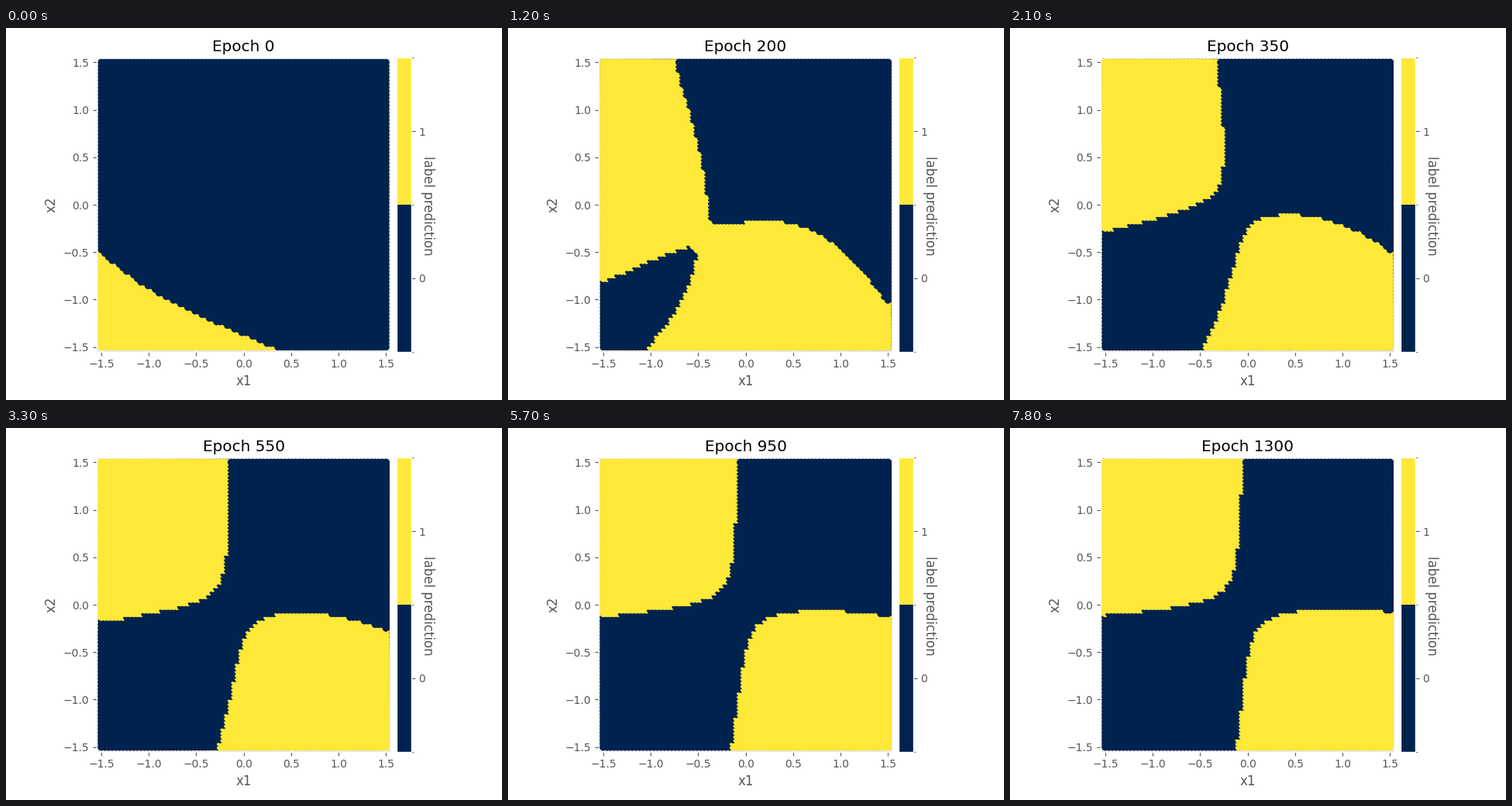
A matplotlib script for the animation above (8 s loop, 640 by 480 pixels).

```python
import numpy as np
import matplotlib.pyplot as plt
from matplotlib.animation import FuncAnimation
from matplotlib.colors import BoundaryNorm, ListedColormap

W, H, DPI = 640, 480, 100
CENTER_X, CENTER_Y, UNIT = 306.6, 228.0, 122.4   # data origin and scale in pixels
LIMIT = 1.55
GREY = "#555555"
EPOCH_STEP, STEPS, TRAIL = 50, 27, 8

plt.rcParams.update({
    "font.family": "DejaVu Sans", "font.size": 10,
    "axes.facecolor": "#E5E5E5", "axes.edgecolor": "white", "axes.linewidth": 1,
    "axes.grid": True, "axes.axisbelow": True, "grid.color": "white",
    "axes.labelcolor": GREY, "axes.labelsize": 12, "axes.titlesize": 14.4,
    "xtick.color": GREY, "ytick.color": GREY, "patch.linewidth": 0.5,
})

axis = np.linspace(-1.5, 1.5, 80)
x, y = (g.ravel() for g in np.meshgrid(axis, axis))
grid = np.column_stack([x, y])
border = np.maximum(abs(x), abs(y)) > 1.499


def single_boundary(epoch):
    """One curve sweeping up from the lower left, fast at first."""
    u = np.log1p(epoch / 15) / np.log1p(100 / 15)
    height = -1.36 + 1.24 * u
    slope = -0.42 - 0.28 * u
    cubic = -0.07 - 0.13 * u
    bulge = 0.45 * u * x**2 / (1 + 0.9 * x**2)
    return height + slope * x + bulge + cubic * x**3 - y


def crossed_boundaries(epoch):
    """Hyperbola around two bent lines that straighten out with training."""
    r = 350 / epoch
    early = np.exp((200 - epoch) / 45)
    upright = (-0.14 * r**0.9 - 0.18 * early + 0.03 * (1 - r) * y
               + (0.06 * early - 0.11 * r**1.6) * y**2 + 0.03 * r * y**3)
    level = (-0.01 - 0.18 * early + (0.06 + 0.11 * early) * x
             - 0.16 * r**1.25 * x**2 - (0.05 * r + 0.025 * early) * x**3)
    return 0.048 * early - 0.04 - (x - upright) * (y - level)


def predict(epoch):
    mix = np.clip((epoch - 100) / 100, 0, 1)
    field = ((1 - mix) * single_boundary(min(epoch, 100))
             + mix * crossed_boundaries(max(epoch, 200)))
    return (field > 0).astype(int)


labels = [predict(EPOCH_STEP * k) for k in range(STEPS)]


def pixel_box(left, right):
    half = LIMIT * UNIT
    return [left / W, 1 - (CENTER_Y + half) / H, (right - left) / W, 2 * half / H]


fig = plt.figure(figsize=(W / DPI, H / DPI), dpi=DPI, facecolor="white")
ax = fig.add_axes(pixel_box(CENTER_X - LIMIT * UNIT, CENTER_X + LIMIT * UNIT))
ax.set(xlim=(-LIMIT, LIMIT), ylim=(-LIMIT, LIMIT), xlabel="x1", ylabel="x2")
ticks = np.arange(-1.5, 1.6, 0.5)
ax.set_xticks(ticks)
ax.set_yticks(ticks)
ax.tick_params(length=3.5)
title = ax.set_title("Epoch 0")

dots = ax.scatter(x, y, c=labels[0], s=36,
                  cmap=ListedColormap(["#00224e", "#fee838"]),
                  norm=BoundaryNorm([-0.5, 0.5, 1.5], 2))

cax = fig.add_axes(pixel_box(503.9, 522.9))
bar = fig.colorbar(dots, cax=cax, ticks=[0, 1])
bar.set_ticks([-0.5, 0.5, 1.5], minor=True)
cax.tick_params(length=3.5)
cax.tick_params(which="minor", length=2)
fig.text(544.4 / W, 1 - 229 / H, "label prediction", rotation=270, size=12,
         color=GREY, ha="center", va="center")


def update(frame):
    step = frame // 3
    # Earlier layers stay visible only through the soft outer rim.
    past = range(max(0, step - TRAIL), step)
    dots.set_offsets(np.vstack([grid[border]] * len(past) + [grid]))
    dots.set_array(np.concatenate([labels[k][border] for k in past] + [labels[step]]))
    title.set_text(f"Epoch {EPOCH_STEP * step}")
    return dots, title


anim = FuncAnimation(fig, update, frames=80, interval=100, repeat=True,
                     repeat_delay=0, blit=False)
plt.show()
```
